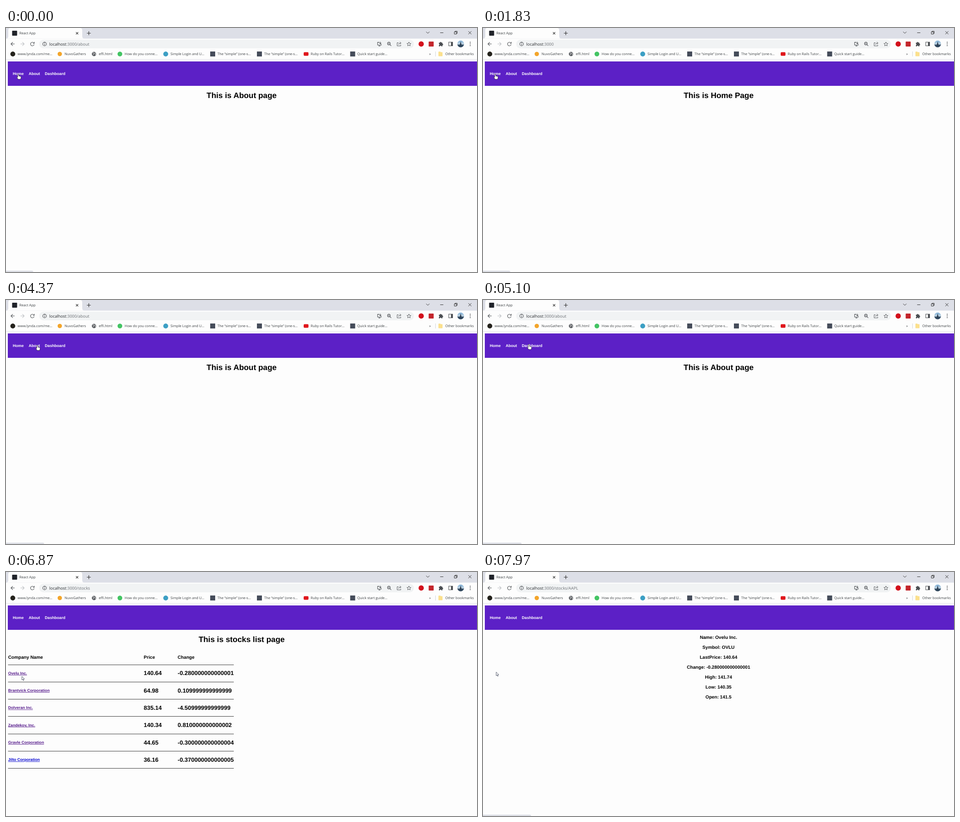
Animation of 1038x540 px, one loop 8000 ms. Source, as an HTML page:

```html
<!DOCTYPE html>
<html lang="en">
<head>
<meta charset="utf-8">
<title>React App</title>
<style>
html, body { margin: 0; width: 100%; height: 100%; overflow: hidden; background: #fdfdfd; }
svg { display: block; width: 1038px; height: 540px; text-rendering: geometricPrecision; }
.ui { font: 7.65px "Open Sans", "Noto Sans", sans-serif; fill: #3c4043; }
.url { font-size: 8.95px; fill: #6b6f74; }
.page { font: bold 8.67px "Liberation Sans", Arial, sans-serif; fill: #000; }
.h1 { font-size: 17.33px; }
.h2 { font-size: 13px; }
.h3 { font-size: 10.14px; }
.mid { text-anchor: middle; }
.nav { fill: #fff; }
.link { fill: #551a8b; text-decoration: underline; }
.new { fill: #0000d0; }
.ico { fill: none; stroke: #4a4d51; stroke-width: 1.1; }
.solid { fill: #4a4d51; }
</style>
</head>
<body>
<svg viewBox="0 0 1038 540">
  <rect width="1038" height="540" fill="#fdfdfd"/>

  <!-- tab strip -->
  <rect width="1038" height="23.5" fill="#dddfe7"/>
  <path d="M0 23.5Q5 23.5 5 18V5Q5 0 10 0H163Q168 0 168 5V18Q168 23.5 173 23.5Z" fill="#fdfdfd"/>
  <rect x="13.5" y="6" width="11" height="11" rx="1" fill="#20232a"/>
  <g class="ico">
    <path d="M154.2 9.2l5 5m0-5l-5 5M178.2 11.5h8.6m-4.3-4.3v8.6" stroke="#333" stroke-width="1.2"/>
    <path d="M926 8.3l3.6 3.6 3.6-3.6M956.8 10.5h7M1019 7.2l6.6 6.6m0-6.6l-6.6 6.6" stroke="#333" stroke-width="1"/>
    <path d="M988 8.6h4.8v4.8h-4.8zM989.5 8.4V7.1h4.8V12h-1.3" stroke="#333" stroke-width="1"/>
  </g>

  <!-- toolbar -->
  <rect x="73" y="26" width="826" height="19" rx="9.5" fill="#f1f3f4"/>
  <g class="ico">
    <path d="M19 35.3h-8m3.9-4l-4 4 4 4"/>
    <path d="M32 35.3h8m-3.9-4l4 4-4 4" stroke="#b9bcc0"/>
    <path d="M61.2 33a4 4 0 1 0 .8 3.4M62.4 30.8v3.2h-3.2"/>
    <circle cx="85" cy="35.4" r="4"/>
    <path d="M85 34.8v3M85 32.6v1.1"/>
    <path d="M823 31.6h-4v6.2h8v-2M825 30.6v4.6m-2-2l2 2 2-2M821 39.6h4"/>
    <circle cx="843.8" cy="34.4" r="3"/>
    <path d="M846 36.6l3 3M842.4 34.4h2.8"/>
    <path d="M865 32.6h-3v7h8v-2.4M864.6 37q.6-3.6 5-3.6m-1.8-2.6l3 2.6-3 2.6" stroke-width=".9"/>
    <path d="M888 31l1.3 3 3.2.3-2.4 2.1.7 3.2-2.8-1.7-2.8 1.7.7-3.2-2.4-2.1 3.2-.3z" stroke-width=".9"/>
    <path d="M975.8 31.3h8.4v8.2h-8.4z"/>
  </g>
  <circle cx="915" cy="35.4" r="5.8" fill="#d3101b"/>
  <rect x="931.5" y="30" width="11" height="11" rx="1" fill="#c3252b"/>
  <g class="solid">
    <path d="M954 32.4h2.4a1.6 1.6 0 0 1 3.2 0h2.2v2.4a1.6 1.6 0 0 1 0 3.2v2.4h-2.4a1.5 1.5 0 0 0-3 0H954V38a1.6 1.6 0 0 0 0-3.1z"/>
    <path d="M980.6 31h3.8v8.6h-3.8z"/>
    <circle cx="1023" cy="31.6" r="1.05"/><circle cx="1023" cy="35.3" r="1.05"/><circle cx="1023" cy="39" r="1.05"/>
  </g>
  <defs>
    <linearGradient id="sky" x2="0" y2="1">
      <stop offset="0" stop-color="#7fb0d8"/><stop offset=".55" stop-color="#c6d8e4"/>
      <stop offset=".62" stop-color="#3d566e"/><stop offset="1" stop-color="#233a50"/>
    </linearGradient>
  </defs>
  <circle cx="1002" cy="35.3" r="7.5" fill="url(#sky)"/>
  <path d="M1002 29.6l2.2 9.4h-4.4z" fill="#26384b"/>

  <!-- bookmarks -->
  <circle cx="15" cy="57.5" r="5.4" fill="#24221c"/>
  <circle cx="118.5" cy="57.5" r="4.8" fill="#f3a52b"/>
  <circle cx="194" cy="57.5" r="4.8" fill="#55585c"/>
  <path d="M190.6 55.4l3.4-.6 1.2 2-2.6 1.2-.6 2.4M196.4 54l1.6 2.6-1.4 3.4" fill="none" stroke="#f4f4f4"/>
  <circle cx="251" cy="57.5" r="5.2" fill="#43c463"/>
  <circle cx="352" cy="57.5" r="5.4" fill="#3c9fc4"/>
  <g fill="#454c5a">
    <rect x="450" y="52" width="11" height="11"/>
    <rect x="553" y="52" width="11" height="11"/>
    <rect x="758.5" y="52" width="11" height="11"/>
  </g>
  <rect x="656" y="53.6" width="10.6" height="7.8" rx="2" fill="#e0161c"/>
  <path d="M946.5 52v11" stroke="#d4d6da" fill="none"/>
  <path d="M953 53.2q0-1 1-1h3l1.2 1.2h2.8q1 0 1 1v7q0 1-1 1h-7q-1 0-1-1z" fill="#fbe08d"/>
  <rect y="69" width="1038" height="1" fill="#e4e5e9"/>

  <rect x="4" y="74" width="1034" height="54" fill="#5c20c6"/>
  <g id="chrome"></g>
  <text class="ui url" x="95.5" y="38.7"><tspan fill="#25282c">localhost</tspan><tspan id="path"></tspan></text>
  <g id="pages"></g>
  <path id="status" fill="#dddfe6"/>
  <path id="hand" fill="#fff" stroke="#222" stroke-width=".75" stroke-linejoin="round"
    d="M-1.2 1Q-1.2 0 0 0Q1 0 1 1V4.2L5 5Q6 5.2 6 6.2V8.6L5 11.6H0L-3 7.8Q-3.1 6.3-1.9 6.7L-1.2 7.3Z"/>
  <path id="arrow" fill="#fff" stroke="#333a50" stroke-width=".8" stroke-linejoin="round"
    d="M0 0V8L1.9 6.4 3.2 9.3 4.5 8.7 3.2 5.9 5.8 5.7Z"/>
</svg>
<script>
const NS = "http://www.w3.org/2000/svg";
const $ = id => document.getElementById(id);

function add(parent, tag, attrs, text = "") {
  const el = document.createElementNS(NS, tag);
  for (const key in attrs) el.setAttribute(key, attrs[key]);
  el.textContent = text;
  return parent.appendChild(el);
}
const label = (parent, cls, x, y, text) => add(parent, "text", { class: cls, x, y }, text);

// Browser labels
const chrome = $("chrome");
label(chrome, "ui", 29.5, 14, "React App");
[[25.5, "www.lynda.com/me..."], [129, "NuvoGathers"], [204.5, "effi.html"],
 [261.5, "How do you conne..."], [362.5, "Simple Login and U..."],
 [466, "The “simple” (one-s..."], [569, "The “simple” (one-s..."],
 [671.5, "Ruby on Rails Tutor..."], [774, "Quick start guide..."],
 [932.5, "»"], [968, "Other bookmarks"]
].forEach(([x, text]) => label(chrome, "ui", x, 60.1, text));
[[15, "Home"], [50, "About"], [85.6, "Dashboard"]]
  .forEach(([x, text]) => label(chrome, "page nav", x, 104, text));

// Pages
const pages = {};
for (const name of ["home", "about", "stocks", "detail"]) pages[name] = add($("pages"), "g", {});
const title = (name, text) => label(pages[name], "page h1 mid", 519.3, 155, text);
title("home", "This is Home Page");
title("about", "This is About page");
title("stocks", "This is stocks list page");

const columns = [4.8, 303.5, 378.3];
["Company Name", "Price", "Change"]
  .forEach((text, i) => label(pages.stocks, "page h3", columns[i], 191.5, text));
const rule = i => add(pages.stocks, "rect",
  { x: 4.5, y: Math.round(204.5 + 38.3 * i), width: 497.5, height: 1, fill: "#3a3a3a" });
rule(0);
[["Ovelu Inc.", "140.64", "-0.280000000000001"],
 ["Brantvick Corporation", "64.98", "0.109999999999999"],
 ["Dolveran Inc.", "835.14", "-4.50999999999999"],
 ["Zandekov, Inc.", "140.34", "0.810000000000002"],
 ["Gravle Corporation", "44.65", "-0.300000000000004"],
 ["Jilto Corporation", "36.16", "-0.370000000000005"]
].forEach(([company, price, change], i) => {
  const y = 228.3 + 38.3 * i;
  label(pages.stocks, "page link" + (i === 5 ? " new" : ""), columns[0], y - 1.5, company);
  label(pages.stocks, "page h2", columns[1], y, price);
  label(pages.stocks, "page h2", columns[2], y, change);
  rule(i + 1);
});

["Name: Ovelu Inc.", "Symbol: OVLU", "LastPrice: 140.64", "Change: -0.280000000000001",
 "High: 141.74", "Low: 140.35", "Open: 141.5"
].forEach((text, i) => label(pages.detail, "page h3 mid", 519, 147.6 + 22 * i, text));

// Timeline: [start ms, value]
const LOOP = 8000;
const pageSteps = [[0, "about"], [600, "home"], [3140, "about"], [5400, "stocks"], [7650, "detail"]];
const pathSteps = [[0, "/about"], [640, ""], [3210, "/about"], [5460, "/stocks"], [7700, "/stocks/AAPL"]];
const statusSteps = [[0, 60], [2800, 84], [4680, 85], [6220, 0], [7150, 106]];
// Pointer tip: [ms, x, y]
const track = [[0, 27, 102], [2500, 27, 102], [2900, 53.5, 98], [3450, 53.5, 98], [3900, 69, 100],
  [4450, 69, 100], [4850, 101, 98], [6000, 101, 98], [6650, 35, 231], [6900, 35, 231],
  [7200, 29, 221.5], [LOOP, 29, 221.5]];
const navLinks = [[15, 39], [50, 75], [85, 131]];

const at = (steps, t) => steps.filter(s => s[0] <= t).pop()[1];

function pointer(t) {
  const i = track.findIndex(k => k[0] > t);
  const [t0, x0, y0] = track[i - 1], [t1, x1, y1] = track[i];
  const p = (t - t0) / (t1 - t0), e = p * p * (3 - 2 * p);
  return [x0 + (x1 - x0) * e, y0 + (y1 - y0) * e];
}

function overLink(x, y, page) {
  if (y > 95 && y < 107) return navLinks.some(([a, b]) => x >= a && x <= b);
  return page === "stocks" && x < 46 && y > 218 && y < 229;
}

function draw(t) {
  const page = at(pageSteps, t);
  for (const name in pages) pages[name].style.display = name === page ? "" : "none";
  $("path").textContent = ":3000" + at(pathSteps, t);

  const w = at(statusSteps, t);
  $("status").setAttribute("d", w ? `M0 537H${w - 3}Q${w} 537 ${w} 540H0Z` : "");

  const [x, y] = pointer(t), hand = overLink(x, y, page);
  for (const id of ["hand", "arrow"]) {
    $(id).setAttribute("transform", `translate(${x} ${y})`);
    $(id).style.display = (id === "hand") === hand ? "" : "none";
  }
}

const start = performance.now();
function tick() {
  draw((performance.now() - start) % LOOP);
  requestAnimationFrame(tick);
}
tick();
</script>
</body>
</html>
```
